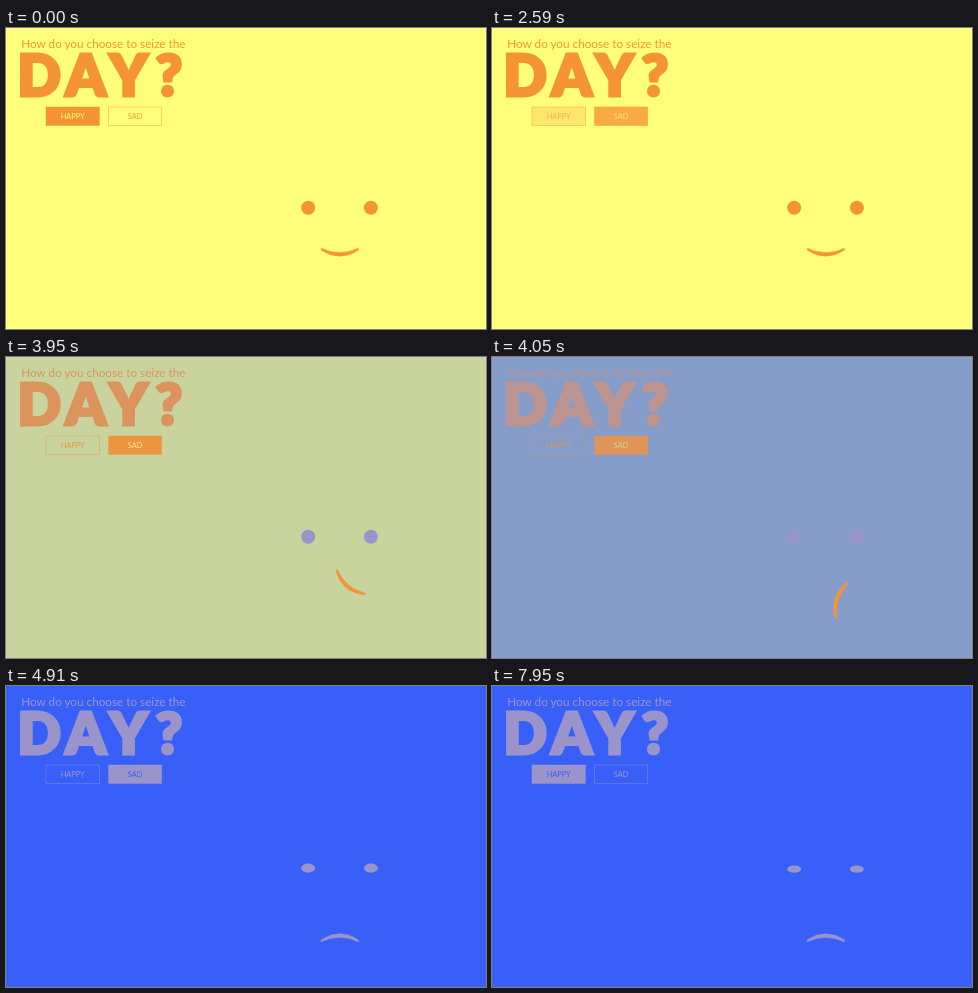
An HTML page for the animation above (8 s loop, 480x301 px).

```html
<!DOCTYPE html>
<html lang="en">
<head>
<meta charset="utf-8">
<title>Seize the day</title>
<style>
  html, body { margin: 0; width: 100%; height: 100%; overflow: hidden; }
  svg { display: block; width: 100%; height: 100%; }
  text { font-family: Lato, "Open Sans", sans-serif; }
  .lead { font-size: 11.73px; stroke: none; }
  .day { font-size: 57px; font-weight: 900; stroke-width: 3; stroke-linejoin: miter; }
  .button text { font-size: 7.4px; text-anchor: middle; }
  .button rect { stroke-width: .8; stroke-opacity: .5; }
</style>
</head>
<body>
<svg viewBox="0 0 480 301">
  <rect id="back" width="480" height="301"/>
  <g id="title">
    <text class="lead" x="15.3" y="19.8">How do you choose to seize the</text>
    <text class="day" x="11.6 59.4 103.6 149.6" y="67.6">DAY?</text>
  </g>
  <g id="happy" class="button">
    <rect x="40" y="79" width="53.5" height="18.5"/>
    <text x="66.7" y="90.9">HAPPY</text>
  </g>
  <g id="sad" class="button">
    <rect x="102.6" y="79" width="53" height="18.5"/>
    <text x="129" y="90.9">SAD</text>
  </g>
  <g id="eyes">
    <ellipse class="eye" cx="302.2" rx="7"/>
    <ellipse class="eye" cx="364.9" rx="7"/>
  </g>
  <path id="mouth" stroke-width=".5" stroke-linejoin="round" d="M315.4 220.2Q333.8 229 352.2 220.2L352.6 222Q333.8 234.4 315 222Z"/>
</svg>
<script>
const LOOP = 8000, BLINK = 3000;
const YELLOW = [255, 255, 124], BLUE = [56, 96, 248];
const ORANGE = [245, 148, 51], LAVENDER = [155, 148, 203];

const $ = id => document.getElementById(id);
const eyes = document.querySelectorAll('.eye');
const ramp = (t, from, to) => Math.min(1, Math.max(0, (t - from) / (to - from)));
const mix = (a, b, k) => a.map((v, i) => v + (b[i] - v) * k);
const rgb = c => `rgb(${c.map(Math.round).join()})`;

function paint(id, color) {
  $(id).setAttribute('fill', rgb(color));
  $(id).setAttribute('stroke', rgb(color));
}

function paintButton(id, fill, ink, paper) {
  const [box, label] = $(id).children;
  box.setAttribute('fill', rgb(ink));
  box.setAttribute('fill-opacity', fill);
  box.setAttribute('stroke', rgb(ink));
  label.setAttribute('fill', rgb(mix(ink, paper, fill)));
}

// Lids close and reopen once per blink period
function eyeOpenness(t) {
  const phase = t % BLINK;
  return 1 - .9 * (ramp(phase, 1810, 2070) - ramp(phase, 2070, 2330));
}

function draw(t) {
  const mood = ramp(t, 3869, 4165);
  $('back').setAttribute('fill', rgb(mix(YELLOW, BLUE, mood)));
  paint('title', mix(ORANGE, LAVENDER, mood));

  const swap = 1 - (1 - ramp(t, 1450, 3600)) ** 2;
  const tint = ramp(t, 3890, 4550);
  const ink = mix(ORANGE, LAVENDER, tint), paper = mix(YELLOW, BLUE, tint);
  paintButton('happy', 1 - swap + ramp(t, 6600, 7200), ink, paper);
  paintButton('sad', swap - ramp(t, 6350, 6780), ink, paper);

  const ry = 7 * eyeOpenness(t);
  eyes.forEach(eye => {
    eye.setAttribute('cy', 186.7 - ry);
    eye.setAttribute('ry', ry);
  });
  $('eyes').setAttribute('fill', rgb(t < 3905 ? ORANGE : LAVENDER));

  $('mouth').setAttribute('transform', `rotate(${180 * ramp(t, 3892, 4156)} 333.8 238)`);
  paint('mouth', mix(ORANGE, LAVENDER, ramp(t, 4060, 4500)));
}

const start = performance.now();
function tick() {
  draw((performance.now() - start) % LOOP);
  requestAnimationFrame(tick);
}
tick();
</script>
</body>
</html>
```
